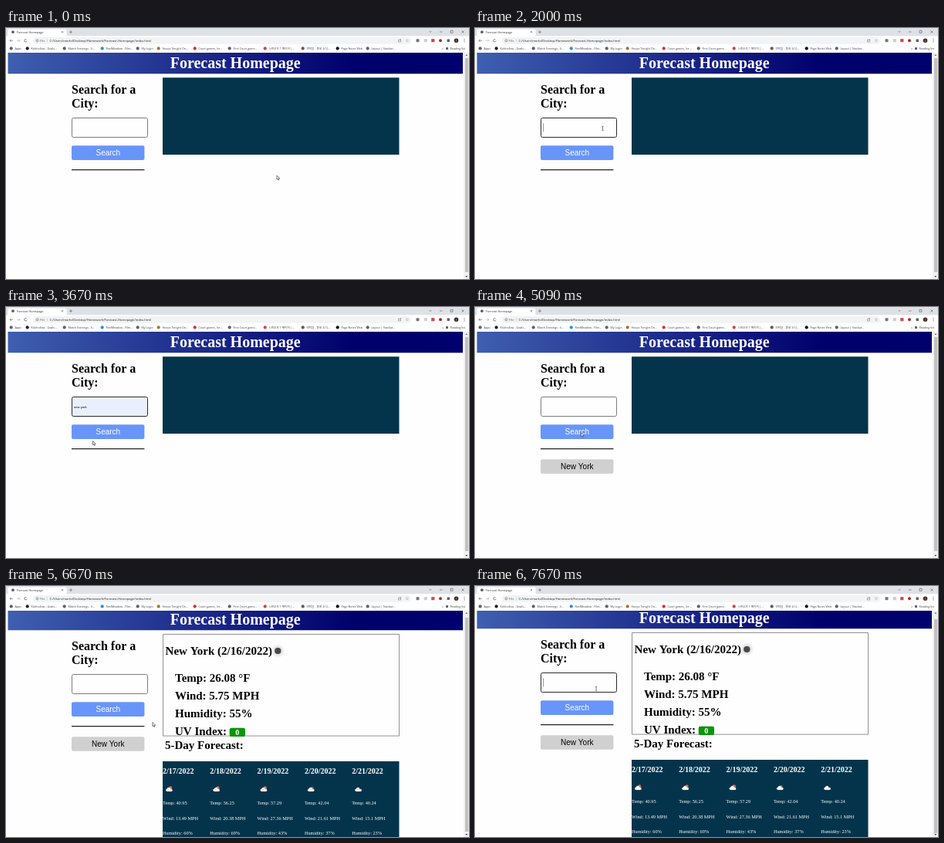
An HTML page with a canvas that plays this animation: 600x325 px, repeating every 8 s.

```html
<!DOCTYPE html>
<html lang="en">
<head>
<meta charset="utf-8">
<title>Forecast Homepage</title>
<style>
html, body { margin: 0; width: 100%; height: 100%; overflow: hidden; background: #fefefe; }
canvas { display: block; width: 600px; height: 325px; }
</style>
</head>
<body>
<canvas id="stage"></canvas>
<script>
const W = 600, H = 325, LOOP = 8000, FPS = 12;
const canvas = document.getElementById('stage');
const ctx = canvas.getContext('2d');
const ratio = window.devicePixelRatio || 1;
canvas.width = W * ratio;
canvas.height = H * ratio;

const SERIF = '"Liberation Serif", serif';
const SANS = '"Liberation Sans", sans-serif';
const UI = '"Open Sans", "Noto Sans CJK KR", "Noto Sans CJK", sans-serif';
const NAVY = '#04344b', PAPER = '#fefefe';

// Moments of the story, in ticks of 1/12 s
const FOCUS = 23, TYPE = 26, LIST = 27, PICK = 36, SUBMIT = 57, RESULT = 62, SCROLL = 80, REFOCUS = 91;

// Pointer path: tick, x, y
const PATH = [
  [0, 351, 191], [6, 351, 191], [11, 292, 178], [16, 222, 163], [20, 181, 139],
  [23, 165.5, 130], [31, 165.5, 130], [34, 142, 147], [36, 136, 148], [38, 125, 160],
  [41, 115, 171], [44, 112.5, 173.5], [47, 121, 171], [51, 137, 163], [67, 137.5, 162.5],
  [71, 152.5, 163], [75, 152.5, 163], [78, 190, 176.5], [86, 190, 176.5], [89, 171, 150],
  [92, 157, 133], [96, 157, 133]
];

const BOOKMARKS = [
  [6, 'Apps', '#5f6368'], [27, 'Kickhollow - Goals...', '#222'], [75, 'Match Evenings - li...', '#5f6368'],
  [124, 'ReelMeadow - Film...', '#2f8fd8'], [170, 'My Login', '#5f6368'], [197, 'Hoops Tonight On...', '#a8742c'],
  [244, 'Court games, Ice...', '#d5342c'], [289, 'First Court game...', '#5f6368'],
  [335, '느린오후 1 페이지 |...', '#d8433b'], [384, '언덕길 - 동네 소식...', '#6a5a50'],
  [429, 'Page Notes Web', '#111'], [468, 'Layout | Stackwi...', '#5f6368']
];

const DAYS = [
  ['17', '40.95', '13.49', 60], ['18', '56.25', '20.38', 69], ['19', '57.29', '27.36', 43],
  ['20', '42.04', '21.61', 37], ['21', '40.24', '15.1', 23]
];

function rect(x, y, w, h, fill, r = 0) {
  ctx.fillStyle = fill;
  ctx.beginPath();
  ctx.roundRect(x, y, w, h, r);
  ctx.fill();
}

function frame(x, y, w, h, stroke, width = 1, r = 0) {
  ctx.strokeStyle = stroke;
  ctx.lineWidth = width;
  ctx.beginPath();
  ctx.roundRect(x, y, w, h, r);
  ctx.stroke();
}

function dot(x, y, r, fill) {
  ctx.fillStyle = fill;
  ctx.beginPath();
  ctx.arc(x, y, r, 0, Math.PI * 2);
  ctx.fill();
}

function line(points, color = '#555', width = 0.6) {
  ctx.strokeStyle = color;
  ctx.lineWidth = width;
  ctx.beginPath();
  points.forEach(([x, y]) => ctx.lineTo(x, y));
  ctx.stroke();
}

function shape(points, fill) {
  ctx.fillStyle = fill;
  ctx.beginPath();
  points.forEach(([x, y]) => ctx.lineTo(x, y));
  ctx.closePath();
  ctx.fill();
}

function text(str, x, y, font, fill = '#000', align = 'left') {
  ctx.font = font;
  ctx.fillStyle = fill;
  ctx.textAlign = align;
  ctx.fillText(str, x, y);
}

function cross(x, y, r) {
  line([[x - r, y - r], [x + r, y + r]]);
  line([[x - r, y + r], [x + r, y - r]]);
}

function drawChrome() {
  rect(0, 0, W, 10.5, '#dee1e6');
  rect(2.5, 1.5, 76, 12, '#fff', 2);
  rect(0, 10.5, W, 21.5, PAPER);
  dot(9, 5.2, 1.9, '#5f6368');
  text('Forecast Homepage', 14, 6.7, '3.7px ' + UI, '#333');
  cross(73, 5.2, 1.1);
  line([[82, 5.2], [86, 5.2]]);
  line([[84, 3.2], [84, 7.2]]);

  line([[548.5, 4], [550, 5.5], [551.5, 4]]);
  line([[562, 5], [565.5, 5]]);
  frame(576, 3.3, 3, 3, '#555', 0.6);
  cross(592, 5, 1.5);

  // Navigation and address bar
  for (const [x, dir, color] of [[7, -1, '#555'], [16, 1, '#aaa']]) {
    line([[x - 2, 16.3], [x + 2, 16.3]], color);
    line([[x + dir * 0.3, 14.6], [x + dir * 2, 16.3], [x + dir * 0.3, 18]], color);
  }
  ctx.strokeStyle = '#555';
  ctx.lineWidth = 0.7;
  ctx.beginPath();
  ctx.arc(25.5, 16.3, 1.7, 0.2, 5.4);
  ctx.stroke();
  rect(35, 12, 490, 8.7, '#f1f3f4', 4.3);
  ctx.lineWidth = 0.5;
  ctx.beginPath();
  ctx.arc(40.5, 16.3, 1.6, 0, 7);
  ctx.stroke();
  line([[40.5, 16], [40.5, 17.3]], '#555', 0.5);
  text('File', 44, 18, '4.15px ' + UI, '#5f6368');
  line([[53.5, 14.3], [53.5, 18.3]], '#bbb', 0.5);
  text('C:/Users/marlo/Desktop/Homework/Forecast-Homepage/index.html', 56.5, 18, '4.15px ' + UI, '#222');

  frame(508.5, 15.2, 3, 2.8, '#666', 0.5);
  line([[510, 16.2], [512, 14]], '#666', 0.5);
  text('☆', 520, 18.1, '5.5px "DejaVu Sans", sans-serif', '#555', 'center');
  rect(531.5, 14.2, 4, 4, '#73777b', 1);
  rect(541.8, 14.2, 4, 4, '#c9ccd1');
  rect(551.2, 14.2, 4.2, 4, '#d34545');
  dot(563, 16.2, 2, '#b5262b');
  rect(571.5, 14.5, 3.5, 3.5, '#5f6368', 0.5);
  dot(583.5, 16.2, 2.8, '#4b2a26');
  text('J', 583.5, 17.5, '3.5px ' + UI, '#fff', 'center');
  for (const y of [14.5, 16.2, 17.9]) dot(594, y, 0.5, '#444');

  BOOKMARKS.forEach(([x, label, color]) => {
    dot(x + 0.7, 26.4, 2.1, color);
    text(label, x + 5.4, 27.9, '3.65px ' + UI, '#444');
  });
  text('»', 565, 27.7, '4px ' + UI, '#444');
  rect(570, 24.9, 3, 3, '#5f6368', 0.5);
  text('Reading list', 575.5, 27.9, '3.65px ' + UI, '#444');
}

function drawScrollbar(offset) {
  rect(593, 32, 7, 293, '#f1f1f1');
  rect(595, 39 + offset, 4.2, 277, '#c1c1c1');
  shape([[595.3, 36], [598.3, 36], [596.8, 34]], '#777');
  shape([[595.3, 321], [598.3, 321], [596.8, 323]], '#444');
}

function drawForm(n) {
  const bold = 'bold 16px ' + SERIF;
  text('Search for a', 85, 84.5, bold);
  text('City:', 85, 103, bold);

  const focused = (n >= FOCUS && n < SUBMIT - 1) || n >= REFOCUS;
  const filled = n >= PICK && n < SUBMIT;
  const typed = filled ? 'new york'
    : n >= TYPE && n < PICK ? 'new'.slice(0, 1 + Math.floor((n - TYPE) / 2)) : '';
  rect(85.5, 116.5, 98, 25, filled ? '#e8f0fe' : PAPER, 2);
  frame(85.5, 116.5, 98, 25, focused ? '#2a2a2a' : '#7c7c7c', 1, 2);
  if (typed) text(typed, 88, 131.2, '4.17px ' + SANS);
  else if (focused) line([[88.5, 123.5], [88.5, 134.5]], '#555', 0.6);

  rect(85, 152.2, 94.4, 18.7, '#6895fa', 2);
  text('Search', 132.3, 165, '10px ' + SANS, '#fff', 'center');
  rect(85, 183.1, 94.4, 1.25, '#222');
  if (n >= SUBMIT) {
    rect(85, 197.2, 94.4, 18.5, '#d0d0d0', 2);
    text('New York', 132.3, 210, '10px ' + SANS, '#000', 'center');
  }
  if (n >= LIST && n < PICK) {
    rect(85, 142.5, 98, 10.3, '#fff', 1);
    frame(85, 142.5, 98, 10.3, '#ccc', 0.5, 1);
    if (n >= 34) rect(85.3, 144, 97.4, 7.4, '#e8e8e9');
    text('new york', 88.5, 149, '4px ' + UI, '#222');
  }
}

function cloud(x, y, kind) {
  if (kind < 3) dot(x + 1.8, y - 1.4, 2.1, '#e8674b');
  else if (kind === 3) dot(x + 1.6, y - 0.8, 2, '#6d7378');
  dot(x - 2.6, y + 1.5, 1.8, '#f4f4f4');
  dot(x - 0.4, y + 0.2, 2.3, '#f4f4f4');
  dot(x + 2.6, y + 1.6, 1.7, '#f4f4f4');
  rect(x - 2.6, y + 1, 5.2, 2.3, '#f4f4f4');
}

function drawResult() {
  const bold = 'bold 15px ' + SERIF;
  frame(203.5, 64.5, 306, 131.6, '#777', 0.8);
  text('New York (2/16/2022)', 206.6, 91, bold);

  const halo = ctx.createRadialGradient(352.3, 86, 3, 352.3, 86, 9.5);
  halo.addColorStop(0, '#c8c8c8');
  halo.addColorStop(1, 'rgba(235,235,235,0)');
  dot(352.3, 86, 9.5, halo);
  dot(352.3, 86, 4.1, '#484848');

  ['Temp: 26.08 °F', 'Wind: 5.75 MPH', 'Humidity: 55%', 'UV Index:'].forEach((row, i) =>
    text(row, 219, 126 + i * 22.9, bold));
  rect(289.7, 185.7, 20.3, 11.3, '#0b950b', 2.5);
  text('0', 299.8, 195.1, 'bold 10px ' + SERIF, '#fff', 'center');
  text('5-Day Forecast:', 206, 213, bold);

  rect(203, 229, 306.5, 110, NAVY);
  DAYS.forEach(([day, temp, wind, humidity], i) => {
    const x = 203 + i * 61.3;
    text(`2/${day}/2022`, x, 244.6, 'bold 10px ' + SERIF, '#fff');
    cloud(x + 8.4, 264.8, i);
    [`Temp: ${temp}`, `Wind: ${wind} MPH`, `Humidity: ${humidity}%`].forEach((row, k) =>
      text(row, x, 285 + k * 19.6, '6.25px ' + SERIF, '#fff'));
  });
}

function drawPage(n, offset) {
  ctx.save();
  ctx.beginPath();
  ctx.rect(0, 32, 593, 293);
  ctx.clip();
  ctx.translate(0, -offset);
  const sky = ctx.createLinearGradient(2, 0, 592, 0);
  sky.addColorStop(0, '#3f5fb0');
  sky.addColorStop(0.76, '#00006c');
  sky.addColorStop(1, '#00006e');
  rect(2.5, 32, 589.5, 27.2, sky);
  text('Forecast Homepage', 297.2, 51.8, 'bold 20px ' + SERIF, '#fff', 'center');
  if (n >= RESULT) drawResult();
  else rect(203, 64.2, 306.5, 99.8, NAVY);
  drawForm(n);
  ctx.restore();
}

function pointerAt(n) {
  const i = PATH.findIndex(key => key[0] > n);
  const [a, ax, ay] = PATH[i - 1], [b, bx, by] = PATH[i];
  const k = (n - a) / (b - a);
  return [ax + (bx - ax) * k, ay + (by - ay) * k];
}

function drawPointer(x, y, offset) {
  const top = 116 - offset;
  if (x > 85 && x < 184 && y > top && y < top + 26) {
    line([[x, y - 2.5], [x, y + 2.5]], '#222', 0.6);
    for (const end of [-2.7, 2.7]) line([[x - 1.1, y + end], [x + 1.1, y + end]], '#222', 0.5);
    return;
  }
  const arrow = [[0, 0], [0, 5.2], [1.2, 4.2], [2, 6], [2.9, 5.6], [2.1, 3.8], [3.7, 3.7]]
    .map(([dx, dy]) => [x + dx, y + dy]);
  shape(arrow, '#fff');
  line([...arrow, arrow[0]], '#222', 0.6);
}

function draw(now) {
  const n = Math.floor((now % LOOP) * FPS / 1000);
  const offset = n < SCROLL ? 0 : Math.min(4, n - SCROLL + 2);
  ctx.setTransform(ratio, 0, 0, ratio, 0, 0);
  rect(0, 0, W, H, PAPER);
  drawPage(n, offset);
  drawScrollbar(offset);
  drawChrome();
  drawPointer(...pointerAt(n), offset);
}

let start;
function tick(now) {
  start ??= now;
  draw(Math.max(0, now - start));
  requestAnimationFrame(tick);
}
draw(0);
requestAnimationFrame(tick);
</script>
</body>
</html>
```
